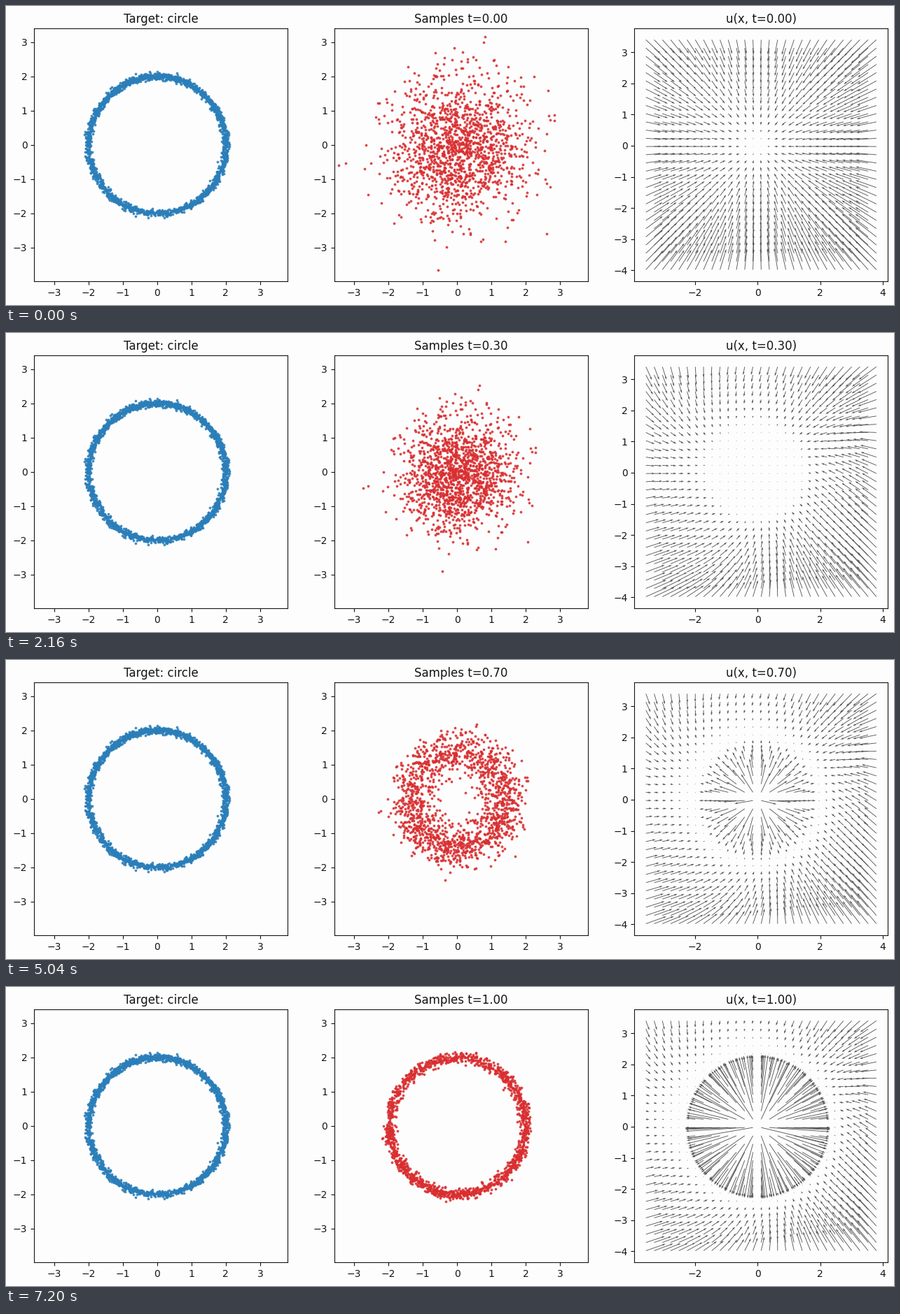
Recreate the animation shown at these times as a matplotlib script. Size 1268 by 428 pixels, loop 7.32 s.

```python
import numpy as np
import matplotlib.pyplot as plt
from matplotlib.animation import FuncAnimation

W, H, DPI = 1268, 428, 100
STEPS, SUB = 60, 4
R = 2.0
XLIM, YLIM = (-3.58, 3.80), (-3.98, 3.40)
PAPER, INK = "#fdfdfd", "#141414"
BLUE, RED, GREY = "#2a7eb9", "#d92e30", "0.33"
rng = np.random.default_rng(7)

# Mean resultant length of a von Mises angle, I1(k)/I0(k), by quadrature.
KAPPA = np.linspace(0, 80, 800)
COS = np.cos((np.arange(600) + 0.5) * np.pi / 600)
WEIGHT = np.exp(KAPPA[:, None] * (COS - 1))
ALIGN = (WEIGHT * COS).sum(1) / WEIGHT.sum(1)


def speed(r, t):
    """Radial velocity carrying a unit Gaussian onto the ring."""
    sigma = np.hypot(1 - t, 0.16)
    a = np.interp(2 * t * r / sigma**2, KAPPA, ALIGN)
    return R * a - (r - R * t * a) / sigma


gx, gy = np.meshgrid(np.linspace(*XLIM, 29), np.linspace(*YLIM, 29))
gr, ga = np.hypot(gx, gy), np.arctan2(gy, gx)
cx, cy = np.cos(ga), np.sin(ga)
edge = np.minimum(np.where(cx > 0, XLIM[1], -XLIM[0]) / np.abs(cx),
                  np.where(cy > 0, YLIM[1], -YLIM[0]) / np.abs(cy))


def field(t):
    """Outward push inside the calm radius, a skewed inward pull outside it."""
    calm = 2.35 * np.sqrt(t)
    depth = np.clip((gr - calm) / (edge - calm), 0, None) * edge
    lean = np.cos(ga + np.pi / 4)
    early = 0.95 + 0.15 * lean
    late = 0.6 + 0.35 * lean - 0.15 * np.cos(4 * ga)
    pull = depth * (early + (late - early) * np.sqrt(t))
    turn = -np.radians(16) * (1 + np.cos(3 * ga)) * (1 - np.exp(-6 * t))
    push = np.maximum(speed(gr, t), 0)
    return (push * cx - pull * np.cos(ga + turn),
            push * cy - pull * np.sin(ga + turn))


start = rng.normal(size=(1500, 2))
r = np.hypot(*start.T)
unit = start / r[:, None]
paths = [start]
for n in range(STEPS * SUB):
    r = r + speed(r, n / (STEPS * SUB)) / (STEPS * SUB)
    if (n + 1) % SUB == 0:
        paths.append(unit * r[:, None])

plt.rcParams.update({
    "font.family": "DejaVu Sans", "text.color": INK, "axes.edgecolor": INK,
    "xtick.color": INK, "ytick.color": INK, "axes.facecolor": PAPER})
fig = plt.figure(figsize=(W / DPI, H / DPI), dpi=DPI, facecolor=PAPER)


def panel(col, xlim, ylim, title=""):
    ax = fig.add_axes([(40.1 + 428.6 * col) / W, 34.1 / H, 362 / W, 362 / H])
    ax.set(xlim=xlim, ylim=ylim)
    return ax, ax.set_title(title)


def padded(lim):
    m = 0.05 * (lim[1] - lim[0])
    return lim[0] - m, lim[1] + m


ax1, _ = panel(0, XLIM, YLIM, "Target: circle")
ax2, title2 = panel(1, XLIM, YLIM)
ax3, title3 = panel(2, padded(XLIM), padded(YLIM))
for ax in (ax1, ax2):
    ax.set_xticks(range(-3, 4))
    ax.set_yticks(range(-3, 4))
ax3.set_xticks(range(-2, 5, 2))
ax3.set_yticks(range(-4, 4))

angle = rng.uniform(0, 2 * np.pi, 2000)
ring = R * np.array([np.cos(angle), np.sin(angle)]) + rng.normal(0, 0.05, (2, 2000))
ax1.scatter(*ring, s=3, color=BLUE, alpha=0.8)
dots = ax2.scatter(*start.T, s=3, color=RED, alpha=0.8)
arrows = ax3.quiver(gx, gy, *field(0), scale=50, color=GREY)


def update(i):
    t = i / STEPS
    dots.set_offsets(paths[i])
    arrows.set_UVC(*field(t))
    title2.set_text(f"Samples t={t:.2f}")
    title3.set_text(f"u(x, t={t:.2f})")
    return dots, arrows, title2, title3


anim = FuncAnimation(fig, update, frames=STEPS + 1, interval=120,
                     repeat=True, repeat_delay=0, blit=False)
plt.show()
```
